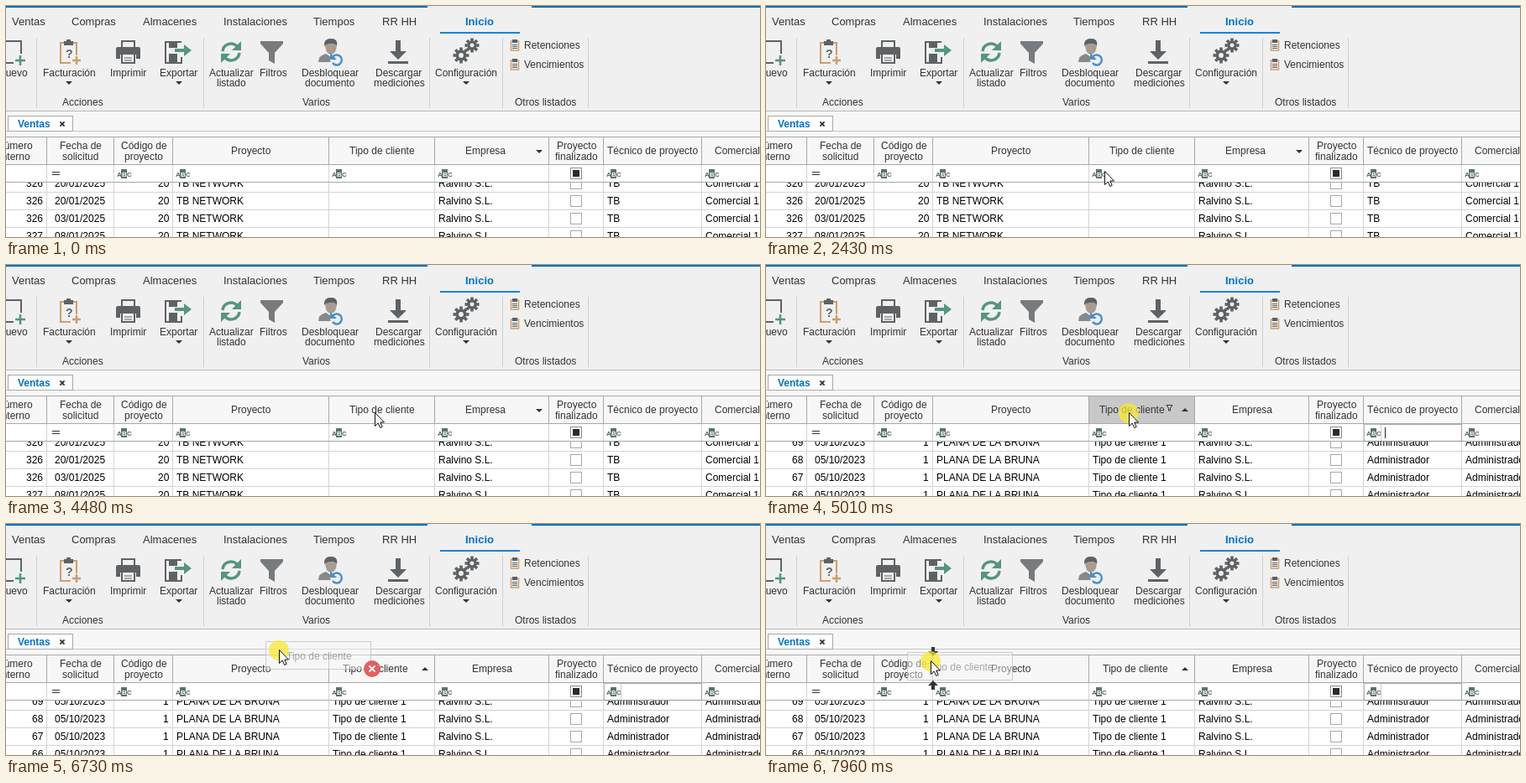
These frames come from a looping animation (898 px wide and 276 px high, 8 s). An HTML page with a canvas:

```html
<!DOCTYPE html>
<html lang="es">
<head>
<meta charset="utf-8">
<style>
html, body { margin: 0; width: 100%; height: 100%; overflow: hidden; background: #fff; }
canvas { display: block; }
</style>
</head>
<body>
<canvas id="stage" width="898" height="276"></canvas>
<script>
const ctx = document.getElementById('stage').getContext('2d');
const W = 898, H = 276, LOOP = 8000;
const FONT = '"Liberation Sans", Arial, sans-serif';
const INK = '#333', ICON = '#5d6265', BLUE = '#0072c6', GREEN = '#56957e', TAN = '#cf9d6c';
const RIBBON = '#f0f0f0', PANEL = '#f7f7f7', EDGE = '#a8a8a8', RULE = '#d4d4d4';

// Moments of the story, in ms.
const SHOW = 400, SWITCH = 4680, PRESS = 4940, RELEASE = 5500, GRAB = 6170, DRAG = 6240;
const OUTSIDE = 6590, INSIDE = 6940, BLINK = 530, LAG = 90;

// Turning points of the pointer: time, x, y.
const path = [
  [400, 516, 253], [1030, 382, 185], [1230, 382, 185], [1370, 292, 180], [1860, 266, 218],
  [2080, 266, 212], [2850, 566, 180], [3530, 570, 178], [3670, 471, 163], [4220, 443, 176],
  [5010, 432, 176], [5430, 417, 161], [5830, 417, 161], [6040, 414, 167], [GRAB, 414, 167],
  [6590, 346, 152], [6730, 325, 150], [7080, 243, 180], [7420, 203, 169], [LOOP, 195, 163]
];

function rect(x, y, w, h, color) {
  ctx.fillStyle = color;
  ctx.fillRect(x, y, w, h);
}
function box(x, y, w, h, color, inside) {
  if (inside) rect(x, y, w, h, inside);
  ctx.strokeStyle = color;
  ctx.lineWidth = 1;
  ctx.strokeRect(x + .5, y + .5, w - 1, h - 1);
}
function text(s, x, y, { align = 0, color = INK, size = 12, bold = false } = {}) {
  ctx.font = `${bold ? 'bold ' : ''}${size}px ${FONT}`;
  const width = ctx.measureText(s).width;
  ctx.fillStyle = color;
  ctx.fillText(s, Math.round(x - width * align), y);
  return width;
}
function center(lines, x, y, gap = 12) {
  lines.split('|').forEach((s, i) => text(s, x, y + i * gap, { align: .5 }));
}
function fill(d, color = ICON) {
  ctx.fillStyle = color;
  ctx.fill(new Path2D(d));
}
function stroke(d, color = ICON, width = 2) {
  ctx.strokeStyle = color;
  ctx.lineWidth = width;
  ctx.stroke(new Path2D(d));
}
function disc(x, y, r, color) {
  ctx.fillStyle = color;
  ctx.beginPath();
  ctx.arc(x, y, r, 0, 7);
  ctx.fill();
}
function at(x, y, draw) {
  ctx.save();
  ctx.translate(x, y);
  draw();
  ctx.restore();
}
const arrowDown = (x, y) => fill(`M${x - 4} ${y - 2}h8l-4 4z`, INK);
const cross = (x, y, r, color) =>
  stroke(`M${x - r} ${y - r}l${2 * r} ${2 * r}M${x + r} ${y - r}l${-2 * r} ${2 * r}`, color, 1.8);

function gear(x, y, r) {
  at(x, y, () => {
    for (let i = 0; i < 8; i++) {
      ctx.rotate(Math.PI / 4);
      rect(-1.8, -r - 3, 3.6, 5, ICON);
    }
    disc(0, 0, r, ICON);
    disc(0, 0, r * .45, RIBBON);
  });
}

// Icons are drawn around the middle of their button.
const icons = {
  page() {
    stroke('M-12 -13H10V2M-12 13H1');
    stroke('M9 4V16M3 10H15', GREEN, 2.5);
  },
  invoice() {
    stroke('M2 13H-10V-11H9V4', TAN, 2);
    stroke('M9 5V15M4 10H14', TAN, 2.5);
    fill('M-6 -13H-3V-15H2V-13H5V-8H-6Z');
    text('?', 0, 7, { align: .5, size: 14, bold: true, color: ICON });
  },
  printer() {
    stroke('M-8 -5V-13H7V-5');
    fill('M-13 -6H12Q14 -6 14 -4V8H9V3H-10V8H-15V-4Q-15 -6 -13 -6Z');
    stroke('M-8 3V13H7V3');
    stroke('M-5 7H4M-5 10H4', ICON, 1);
  },
  disk() {
    stroke('M3 -12H-16V13H3V6');
    rect(-12, -13, 10, 8, ICON);
    rect(-12, 2, 10, 11, ICON);
    fill('M-5 -4H6V-9L15 -2L6 5V0H-5Z', GREEN);
  },
  refresh() {
    for (let i = 0; i < 2; i++) {
      stroke('M-10 -1A10 10 0 0 1 7 -7', GREEN, 3.5);
      fill('M12 -13V-2H1Z', GREEN);
      ctx.rotate(Math.PI);
    }
  },
  funnel() {
    fill('M-15 -13H12V-10L2 1V14L-5 10V1L-15 -10Z', '#777b7d');
  },
  user() {
    fill('M-14 12Q-14 4 -5 2L1 6L7 2Q15 4 15 12Z', '#84898c');
    fill('M-6 -8Q-6 -16 1 -16Q8 -16 8 -8Q7 3 1 3Q-5 3 -6 -8Z', '#a89c92');
    fill('M-7 -7Q-8 -16 1 -16Q10 -16 8 -7Q6 -11 0 -10Q-5 -10 -7 -7Z');
    disc(8, 9, 8, RIBBON);
    stroke('M3 6A6 6 0 1 1 3 13', '#4a8fcb', 2.5);
    fill('M0 1V9H8Z', '#4a8fcb');
  },
  download() {
    fill('M-4 -14H2V-1H9L-1 9L-11 -1H-4Z');
    rect(-13, 11, 24, 3, ICON);
  },
  gears() {
    gear(-6, 4, 6.5);
    gear(7, -8, 5.5);
  }
};

// Label, middle, icon; a trailing true marks a drop-down.
const buttons = [
  ['Nuevo', 8, 'page'], ['Facturación', 75, 'invoice', true], ['Imprimir', 146, 'printer'],
  ['Exportar', 206, 'disk', true], ['Actualizar|listado', 268, 'refresh'], ['Filtros', 318, 'funnel'],
  ['Desbloquear|documento', 386, 'user'], ['Descargar|mediciones', 468, 'download'],
  ['Configuración', 548, 'gears', true]
];

function ribbon() {
  rect(0, 0, W, 125, RIBBON);
  rect(0, 0, 502, 2, BLUE);
  rect(626, 0, W, 2, BLUE);
  let x = 7;
  for (const tab of ['Ventas', 'Compras', 'Almacenes', 'Instalaciones', 'Tiempos', 'RR HH']) {
    x += text(tab, x, 23, { size: 13 }) + 31.7;
  }
  text('Inicio', 564, 23, { size: 13, bold: true, color: BLUE, align: .5 });
  rect(517, 31, 95, 2, '#1883d7');

  for (const [label, mid, icon, menu] of buttons) {
    at(mid, 55, icons[icon]);
    center(label, mid, 84);
    if (menu) arrowDown(mid, 92);
  }
  ['Retenciones', 'Vencimientos'].forEach((label, i) => at(600, 40 + i * 23, () => {
    stroke('M1.500 2H10.500V13H1.500Z', TAN, 1.5);
    rect(3, 0, 6, 4, ICON);
    stroke('M3 6.500H9M3 8.500H9M3 10.500H9', ICON, 1);
    text(label, 17, 11);
  }));
  center('Acciones', 91, 119);
  center('Varios', 370, 119);
  center('Otros listados', 643, 119);
  for (const edge of [36, 235, 504, 591, 693]) rect(edge, 38, 1, 84, '#d0d0d0');
}

function documentTab() {
  rect(0, 125, W, 31, PANEL);
  rect(0, 125, W, 1, '#b9b9b9');
  rect(0, 149, W, 1, '#c4c4c4');
  box(2, 131, 78, 19, EDGE, '#fff');
  text('Ventas', 14, 145, { bold: true, color: BLUE });
  cross(67, 141, 2.6, INK);
}

// Title, left edge, kind of cell, text before and after the switch by row.
const days = ['20', '20', '03', '08'];
const columns = [
  ['Número|interno', -30, 'number', i => i < 3 ? 326 : 327, i => 69 - i],
  ['Fecha de|solicitud', 48, 'date', i => days[i] + '/01/2025', () => '05/10/2023'],
  ['Código de|proyecto', 128, 'number', () => 20, () => 1],
  ['Proyecto', 198, 'text', () => 'TB NETWORK', () => 'PLANA DE LA BRUNA'],
  ['Tipo de cliente', 384, 'text', () => '', () => 'Tipo de cliente 1'],
  ['Empresa', 510, 'text', () => 'Ralvino S.L.', () => 'Ralvino S.L.'],
  ['Proyecto|finalizado', 646, 'check'],
  ['Técnico de proyecto', 711, 'text', () => 'TB', () => 'Administrador'],
  ['Comercial', 828, 'text', () => 'Comercial 1', () => 'Administrador']
].map(([title, left, kind, before, after], i, all) =>
  ({ title, left, kind, before, after, right: i + 1 < all.length ? all[i + 1][1] : 912 }));

function cell(column, value, y) {
  const { left, right, kind } = column, color = '#000';
  if (kind === 'check') box(672, y - 11, 14, 14, EDGE, '#fff');
  else if (kind === 'number') text(value, right - 4, y, { align: 1, color });
  else if (kind === 'date') text(value, (left + right) / 2, y, { align: .5, color });
  else text(value, left + 5, y, { color });
}

function header(column, t) {
  const { title, left, right } = column;
  const sorted = title === (t < SWITCH ? 'Empresa' : 'Tipo de cliente');
  const hover = sorted && t >= SWITCH && t < DRAG;
  if (hover) rect(left, 156, right - left, 34, '#c8c8c8');
  const shift = hover ? -12 : sorted ? -8 : 0;
  const two = title.includes('|');
  center(title, (left + right) / 2 + 1 + shift, two ? 171 : 177, 13);
  if (sorted && t < SWITCH) arrowDown(635, 174);
  else if (sorted) fill('M495 175h8l-4 -4z', INK);
  if (hover) stroke('M477 167.500H484L481.500 171V174H479.500V171Z', INK, 1);
}

function filterCell({ left, kind }) {
  if (kind === 'date') stroke('M55 198.500H64M55 201.500H64', INK, 1);
  if (kind === 'check') {
    box(672, 193, 14, 14, '#8c8c8c', '#fff');
    rect(675, 196, 8, 8, '#2b2b2b');
  }
  if (kind !== 'text' && left !== 128) return;
  const small = { size: 8, bold: true, color: ICON };
  text('A', left + 4, 204, small);
  rect(left + 9, 195, 7, 11, '#5a7468');
  text('B', left + 12.5, 204, { ...small, color: '#fff', align: .5 });
  text('C', left + 16, 204, small);
}

function grid(t) {
  const after = t >= SWITCH;
  rect(0, 156, W, 34, PANEL);
  rect(0, 190, W, H, '#fff');
  ctx.save();
  ctx.beginPath();
  ctx.rect(0, 211, W, H);
  ctx.clip();
  for (let i = 0; i < 4; i++) {
    const y = 216 + i * 21;
    for (const c of columns) cell(c, c.before && (after ? c.after : c.before)(i), y);
    rect(0, y + 6, W, 1, RULE);
  }
  ctx.restore();

  for (const c of columns) {
    header(c, t);
    filterCell(c);
    rect(c.left, 156, 1, 34, EDGE);
    rect(c.left, 190, 1, H, RULE);
  }
  for (const y of [156, 189, 210]) rect(0, y, W, 1, EDGE);

  if (after) {
    ctx.setLineDash([1, 1]);
    box(712, 190, 117, 21, '#777');
    box(732, 190, 97, 21, '#999');
    ctx.setLineDash([]);
    const blinkOn = Math.floor((t - RELEASE) / BLINK) % 2 !== 0;
    if (t < RELEASE || (blinkOn && t < OUTSIDE)) rect(737, 194, 1, 13, '#222');
  }
}

function pointerAt(t) {
  const i = Math.max(1, path.findIndex(key => key[0] > t));
  const [t0, x0, y0] = path[i - 1], [t1, x1, y1] = path[i];
  const u = (t - t0) / (t1 - t0);
  return [Math.round(x0 + (x1 - x0) * u), Math.round(y0 + (y1 - y0) * u)];
}

function draggedHeader(t) {
  const [x, y] = pointerAt(t - LAG);
  ctx.save();
  ctx.globalAlpha = .45;
  box(x - 29, y - 11, 126, 34, '#999', PANEL);
  text('Tipo de cliente', x - 4, y + 11, { color: '#444' });
  ctx.restore();
  if (t >= INSIDE) {
    fill('M197 147h4v5h4l-6 6l-6 -6h4z', INK);
    fill('M197 198h4v-5h4l-6 -6l-6 6h4z', INK);
  } else if (t >= OUTSIDE) {
    disc(436, 173, 10, '#e26161');
    cross(436, 173, 3.5, '#fff');
  }
}

function pointer(t) {
  const [x, y] = pointerAt(t);
  const pressed = (t >= PRESS && t < RELEASE) || t >= GRAB;
  if (pressed) disc(x, y + 1, 12, 'rgba(250,232,50,.74)');
  at(x, y, () => {
    const shape = 'M.5 .5V16.500L4.200 13L6.700 18.500L9.200 17.400L6.800 12H11.500Z';
    fill(shape, '#fff');
    stroke(shape, '#111', 1);
  });
}

function frame(now) {
  const t = now % LOOP;
  ribbon();
  documentTab();
  grid(t);
  if (t >= DRAG) draggedHeader(t);
  if (t >= SHOW) pointer(t);
  requestAnimationFrame(frame);
}
requestAnimationFrame(frame);
</script>
</body>
</html>
```
